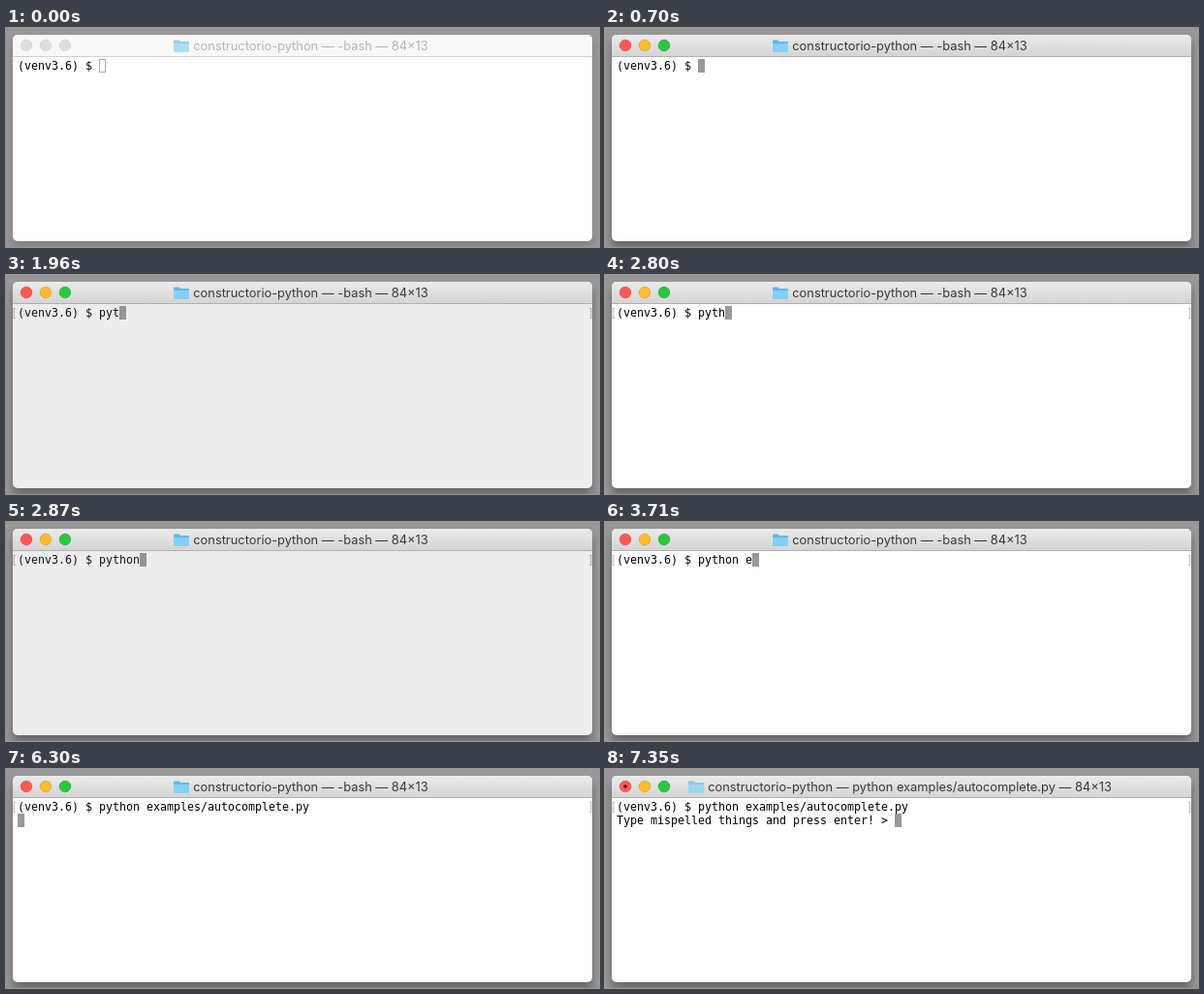
Write an HTML page that moves like this. It is 612 px wide and 226 px high and loops after 8 s.

```html
<!DOCTYPE html>
<html lang="en">
<head>
<meta charset="utf-8">
<title>Terminal</title>
<style>
  html, body { margin: 0; width: 100%; height: 100%; overflow: hidden; background: #979797; }
  svg { display: block; width: 612px; height: 226px; }
  text { white-space: pre; }
  .mono { font: 11.63px "DejaVu Sans Mono", monospace; }
  .mark { fill: #b4b4b4; }
  #title { font: 12.85px Inter, sans-serif; text-anchor: middle; fill: #383838; }
  #frame { fill: #fff; filter: drop-shadow(0 8px 5px rgba(0, 0, 0, .3)); }
  #bar { fill: url(#active); }
  #edge { fill: #b0b0b0; }
  .light { stroke-width: .7; }
  #cursor { fill: #999; }
  .inactive #title { fill: #b5b5b5; }
  .inactive #frame { filter: drop-shadow(0 6px 4px rgba(0, 0, 0, .14)); }
  .inactive #bar { fill: #f8f8f8; }
  .inactive #edge { fill: #d0d0d0; }
  .inactive .light { fill: #dedede; stroke: #d2d2d2; }
  .inactive #cursor { fill: none; stroke: #aaa; }
</style>
</head>
<body>
<svg id="stage" viewBox="0 0 612 226">
  <defs>
    <linearGradient id="active" x2="0" y2="1">
      <stop stop-color="#ebebeb"/>
      <stop offset="1" stop-color="#d4d4d4"/>
    </linearGradient>
  </defs>
  <rect id="frame" x="7" y="7" width="598" height="213" rx="5"/>
  <path id="bar" d="M7 29V12a5 5 0 0 1 5-5H600a5 5 0 0 1 5 5V29Z"/>
  <rect id="edge" x="7" y="29" width="598" height="1"/>
  <circle class="light" cx="21" cy="18" r="5.8" fill="#fc5b54" stroke="#e0443e"/>
  <circle class="light" cx="41" cy="18" r="5.8" fill="#fdbc2f" stroke="#dfa023"/>
  <circle class="light" cx="61" cy="18" r="5.8" fill="#2ac840" stroke="#1dab2d"/>
  <circle id="dot" cx="21" cy="18" r="1.8" fill="#4d0000"/>
  <g id="folder">
    <path d="M0 1.5Q0 .5 1 .5H5.5L7 2H15Q16 2 16 3V11.5Q16 12.5 15 12.5H1Q0 12.5 0 11.5Z" fill="#5fb9e8"/>
    <path d="M0 4H16V11.5Q16 12.5 15 12.5H1Q0 12.5 0 11.5Z" fill="#84d0f7"/>
  </g>
  <text id="title" x="314.5" y="23"></text>
  <rect id="cursor" height="14"/>
  <text id="line0" class="mono" x="12" y="43"></text>
  <text id="line1" class="mono" x="12" y="57"></text>
  <g id="marks" class="mono mark">
    <text x="5" y="43">[</text>
    <text x="600" y="43">]</text>
  </g>
  <path id="bell" d="M7 30H605V215a5 5 0 0 1-5 5H12a5 5 0 0 1-5-5Z" fill="#808080"/>
</svg>
<script>
const LOOP = 8000, FOCUS = 700, RUN = 6440, STEP = 70;
const BELLS = [1960, 2870];
const TYPED = [
  [0, "(venv3.6) $ "], [1400, "p"], [1680, "y"], [1750, "t"], [2800, "h"], [2870, "on"],
  [3430, " "], [3710, "e"], [4130, "x"], [4340, "amples/"], [5250, "a"], [5460, "u"],
  [5530, "tocomplete.py "], [6300, "\n"], [7350, "Type mispelled things and press enter! > "]
];
const $ = id => document.getElementById(id);
const set = (id, attrs) => {
  for (const name in attrs) $(id).setAttribute(name, attrs[name]);
};
const show = (id, on) => set(id, { visibility: on ? "visible" : "hidden" });

// The visual bell flashes at once and fades in four steps.
function bellAlpha(t) {
  const start = BELLS.findLast(b => b <= t) ?? -LOOP;
  return 0.14 * Math.max(0, 1 - Math.floor((t - start) / STEP) / 4);
}

function draw(t) {
  const focused = t >= FOCUS, running = t >= RUN;
  $("stage").classList.toggle("inactive", !focused);

  const command = running ? "python examples/autocomplete.py" : "-bash";
  $("title").textContent = `constructorio-python — ${command} — 84×13`;
  set("folder", {
    transform: `translate(${running ? 86 : 173} 12)`,
    opacity: focused && !running ? 1 : 0.65
  });
  show("dot", running);

  const lines = TYPED.filter(([at]) => at <= t).map(([, s]) => s).join("").split("\n");
  $("line0").textContent = lines[0];
  $("line1").textContent = lines[1] ?? "";

  const row = lines.length - 1, inset = focused ? 0 : 0.5;
  set("cursor", {
    x: 12 + 7 * lines[row].length + inset, y: 32 + 14 * row + inset,
    width: 7 - 2 * inset, height: 14 - 2 * inset
  });
  show("marks", t >= BELLS[0]);
  set("bell", { opacity: bellAlpha(t) });
}

const begin = performance.now();
function tick() {
  draw((performance.now() - begin) % LOOP);
  requestAnimationFrame(tick);
}
tick();
</script>
</body>
</html>
```
